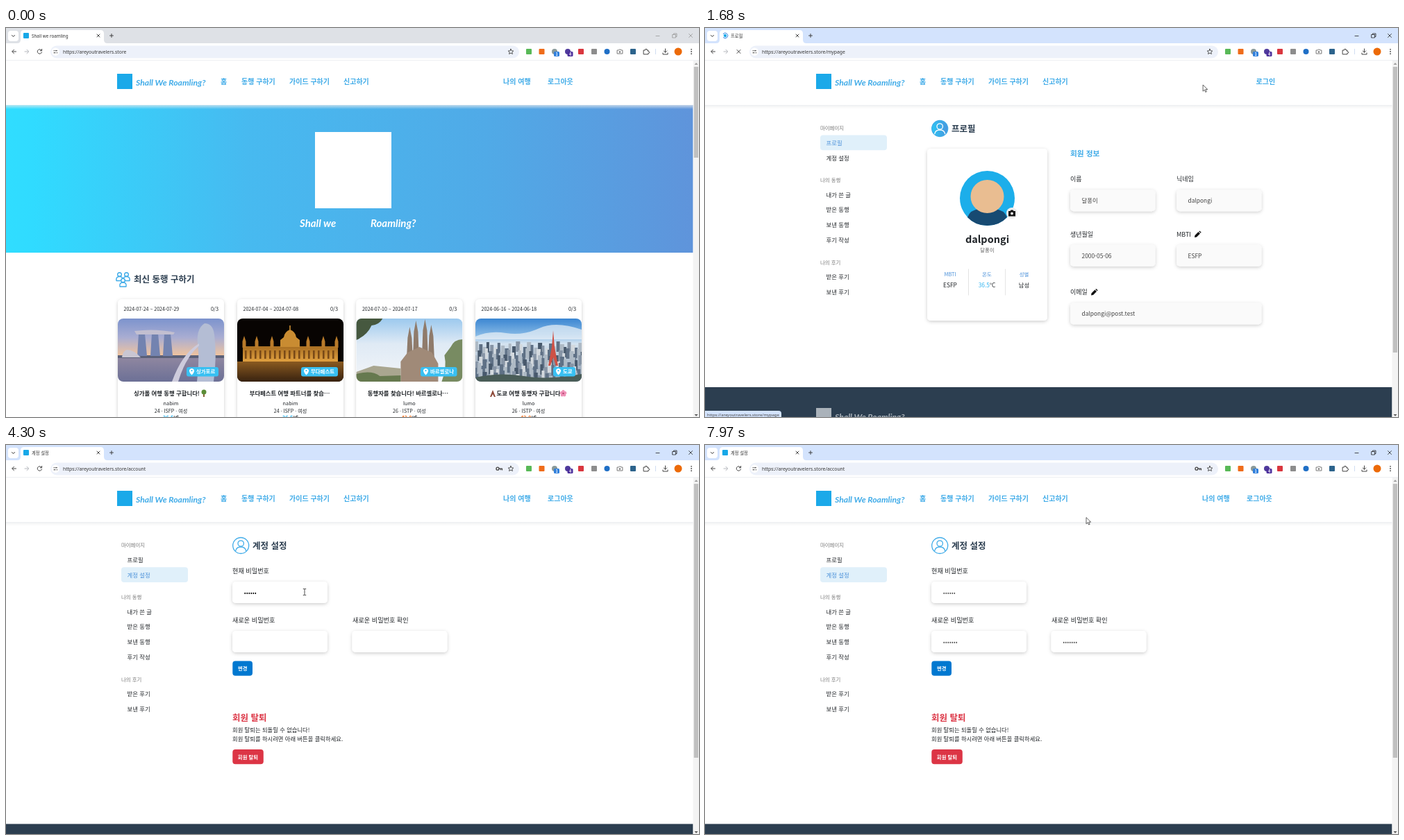
Animation of 998x561 px, one loop 8 s. Source, as an HTML page:

```html
<!DOCTYPE html>
<html lang="ko">
<head>
<meta charset="utf-8">
<style>
html, body { margin: 0; width: 100%; height: 100%; overflow: hidden; background: #fff; }
svg { display: block; width: 998px; height: 561px; font-family: "Noto Sans CJK KR", "Noto Sans CJK", "Noto Sans", sans-serif; }
.ui { font-family: "Noto Sans", "Noto Sans CJK KR", sans-serif; }
.script { font-family: Lato, sans-serif; font-style: italic; font-weight: 700; }
.line { fill: none; stroke-linecap: round; stroke-linejoin: round; }
</style>
</head>
<body>
<svg id="stage" viewBox="0 0 998 561" xmlns="http://www.w3.org/2000/svg"></svg>
<script>
const LOOP = 8000;
const SITE = 'https://areyoutravelers.store';
const INK = '#212529', SKY = '#3fabe8', NAVY = '#2c3e50', RED = '#dc3545';

const text = (x, y, s, size = 8.32, fill = INK, weight = 400, anchor = 'start', extra = '') =>
  `<text x="${x}" y="${y}" font-size="${size}" fill="${fill}" font-weight="${weight}" text-anchor="${anchor}" ${extra}>${s}</text>`;
const rect = (x, y, w, h, fill, r = 0, extra = '') =>
  `<rect x="${x}" y="${y}" width="${w}" height="${h}" rx="${r}" fill="${fill}" ${extra}/>`;
const circle = (x, y, r, fill, extra = '') => `<circle cx="${x}" cy="${y}" r="${r}" fill="${fill}" ${extra}/>`;
const shape = (d, fill, extra = '') => `<path d="${d}" fill="${fill}" ${extra}/>`;
const line = (d, stroke = '#444', w = 1, extra = '') => `<path class="line" d="${d}" stroke="${stroke}" stroke-width="${w}" ${extra}/>`;
const group = (id, body, extra = '') => `<g id="${id}" ${extra}>${body}</g>`;
const repeat = (n, make) => Array.from({ length: n }, (_, i) => make(i)).join('');
const gradient = (id, stops, vertical) =>
  `<linearGradient id="${id}" x2="${vertical ? 0 : 1}" y2="${vertical ? 1 : 0}">` +
  stops.map(([o, c]) => `<stop offset="${o}" stop-color="${c}"/>`).join('') + '</linearGradient>';
const SHADOW = 'filter="url(#shadow)"';

const defs = `<defs>
  <filter id="shadow" x="-10%" y="-25%" width="120%" height="160%"><feDropShadow dx="0" dy="1.5" stdDeviation="2.5" flood-opacity=".2"/></filter>
  ${gradient('hero', [[0, '#30ddff'], [.04, '#30dbff'], [.35, '#47baf0'], [.7, '#50aae7'], [1, '#5f94db']])}
  ${gradient('edge', [[0, '#e6e9ecc0'], [1, '#f0f0f000']], 1)}
  ${gradient('brand', [[0, '#2cc5f4'], [1, '#4a95dd']])}
  ${gradient('dusk', [[0, '#7c93cd'], [.3, '#a9add2'], [.58, '#eec3a0'], [.63, '#8e86a0'], [1, '#6c7096']], 1)}
  ${gradient('river', [[0, '#8a5a20'], [1, '#35200f']], 1)}
  ${gradient('day', [[0, '#9cc9ee'], [.4, '#dfeaf5'], [1, '#f3f5f8']], 1)}
  ${gradient('noon', [[0, '#3b86d2'], [.25, '#82b6e4'], [.4, '#d5e4f1'], [1, '#8493a5']], 1)}
  ${gradient('gold', [[0, '#a86e22'], [1, '#e0a040']], 1)}
  <clipPath id="photo"><rect width="153" height="91" rx="8"/></clipPath>
</defs>`;

function chrome() {
  const winButtons = line('M936 11.5h5M960 9.5h4.5v4.5h-4.5zM961.5 9v-1h4.5v4.5h-1M983.5 8.5l5 5M988.5 8.5l-5 5', '#222', .8, 'id="winButtons"');
  const plain = [['s', 753, '#58b957'], ['s', 771.5, '#ef6c1a'], ['c', 790, '#8a9a9a'], ['c', 809, '#4f3a9c'],
    ['s', 828, '#d9363e'], ['s', 847, '#8d8d8d'], ['c', 865.5, '#1f6fc6'], ['s', 903, '#2c638c']];
  const extensions = plain.map(([kind, x, c]) =>
    kind === 'c' ? circle(x, 34, 4, c) : rect(x - 4, 30, 8, 8, c, 1)).join('');
  const badge = (x, n, c) => rect(x - 4, 34, 8, 7, c, 1.5) + text(x, 39.6, n, 5.5, '#fff', 700, 'middle');
  return rect(0, 0, 998, 24, '#d3e3fd', 0, 'id="tabBar"') +
    rect(3, 4, 15, 15, '#fff', 4) + line('M8.5 10.5l2 2 2-2', '#333', 1) +
    shape('M16 22q5 0 5-5V8q0-5 5-5H136q5 0 5 5V17q0 5 5 5V25H16z', '#fff') +
    rect(0, 22, 998, 25, '#fff') + rect(0, 46.5, 998, .6, '#dfe3ea') +
    group('favicon', rect(25, 7, 8, 8, '#17a8e8', 1)) +
    group('spinner', circle(29, 11, 2.2, '#17a8e8') + line('M29 7.2a3.8 3.8 0 1 1-3.8 3.8', '#2b7de0', .9)) +
    text(37, 13.7, '', 6.3, '#333', 400, 'start', 'id="tabTitle" class="ui"') +
    line('M131 9l4 4M135 9l-4 4', '#333', .9) + line('M149.5 11h5M152 8.5v5', '#333', .9) + winButtons +
    rect(64, 25.5, 675, 18, '#edf1fa', 9) + circle(71.3, 34.3, 5.7, '#fff') +
    line('M69 32.8h.5M71 32.8h2.5M69 35.8h2M73.2 35.8h.5', '#333', 1.1) +
    text(82, 36.7, '', 6.8, '#333', 400, 'start', 'id="url" class="ui"') +
    line('M14.5 34h-5.5M11.5 31.2L8.7 34l2.8 2.8', '#444') + line('M27 34h5.5M30 31.2l2.8 2.8-2.8 2.8', '#b5b8bd') +
    group('reload', line('M51.3 32.5a3.2 3.2 0 1 0 .2 2.5M51.6 30.5v2.3h-2.3', '#444')) +
    group('stop', line('M46 31.5l5 5M51 31.5l-5 5', '#444')) +
    line('M727 30.3l1.1 2.5 2.7.3-2 1.8.6 2.6-2.4-1.4-2.4 1.4.6-2.6-2-1.8 2.7-.3z', '#444', .9) +
    group('key', circle(708, 34.2, 2, 'none', 'stroke="#444" stroke-width="1.3"') + line('M710 34.2h4.5v1.8M712.5 34.2v1.5', '#444', 1.2)) +
    extensions + badge(793, '1', '#2f7fdc') + badge(812.5, '4', '#4b2f9b') +
    line('M880.5 32h2l.8-1h1.8l.8 1h2v5h-7.4z', '#777') + circle(884, 34.5, 1.3, '#777') +
    line('M918.5 32h2.2a1.2 1.2 0 1 1 2.2 0h2v2.2a1.2 1.2 0 1 1 0 2v1.7h-6.4z', '#444') +
    rect(935, 30, .8, 8, '#c5d5ef') + line('M949.5 30v5M947.3 33l2.2 2.2 2.2-2.2M946 36v2h7v-2', '#444') +
    circle(968, 34, 5.5, '#ec6a08') + [30.8, 34, 37.2].map(y => circle(987, y, .9, '#444')).join('');
}

const scrollbar = bottom => rect(989.5, 47, 8.5, 514, '#f3f3f3') + rect(990.7, 56, 6.3, bottom - 56, '#c0c0c0') +
  shape('M991.5 53l2.5-3 2.5 3z', '#a0a0a0') + shape('M991.5 557l2.5 3 2.5-3z', '#606060');

function header() {
  const nav = [[309, '홈'], [339, '동행 구하기'], [408, '가이드 구하기'], [486, '신고하기']];
  return rect(0, 47, 989.5, 64, '#fff') + rect(0, 111, 989.5, 6, 'url(#edge)') +
    rect(160, 66, 22, 22, '#1ba9e9') + text(187, 82.5, 'Shall We Roamling?', 12.2, SKY, 700, 'start', 'class="script"') +
    nav.map(([x, s]) => text(x, 81.2, s, 10, SKY, 700)).join('') +
    group('member', text(716, 81.2, '나의 여행', 10, SKY, 700, 'start', 'id="myTrip"') + text(780, 81.2, '로그아웃', 10, SKY, 700)) +
    group('guest', text(793.5, 81.2, '로그인', 10, SKY, 700));
}

const marina = rect(0, 0, 153, 91, 'url(#dusk)') + rect(0, 53, 153, 4, '#5b6078') +
  [29, 48, 66].map(x => shape(`M${x - 1} 54L${x + 1} 22h9l3 32z`, '#7383b0')).join('') +
  shape('M24 18q30-4 58 2l-2 3H27z', '#c2bfd0') + shape('M6 56q1-9 7-11 10 0 20 11z', '#c9c6d2') +
  shape('M114 91q3-26 2-46-5-30 9-38 12 0 14 16 4 32-1 68z', '#b4bdd4') +
  shape('M117 36q-24 14-39 55h9q10-34 30-52z', '#cdcbdc');

const palace = rect(0, 0, 153, 92, '#080402') + rect(0, 62, 153, 30, 'url(#river)') + rect(8, 40, 137, 22, 'url(#gold)') +
  shape('M62 41V31l5-4q1-8 9-11 8 3 9 11l5 4v10z', '#c98c32') + rect(75.2, 10, 1.6, 8, '#c98c32') +
  [10, 28, 50, 102, 124, 143].map(x => shape(`M${x - 2.5} 42v-9l2.5-8 2.5 8v9z`, '#b97b2a')).join('') +
  repeat(19, i => rect(11 + i * 7, 46, 2.6, 12, '#7a4a17'));

const basilica = rect(0, 0, 153, 91, 'url(#day)') +
  [[77, 12], [86, 3], [99, 1], [108, 9]].map(([x, y]) => shape(`M${x - 5} 70L${x - 3} ${y + 16}l3-16 3 16 2 ${54 - y}z`, '#8f7b6b')).join('') +
  shape('M64 91V62l10-13 17-8 18 8 9 16v26z', '#a08a78') + shape('M0 91V77l25-9 39 4v19z', '#a9a690') +
  shape('M0 91V80q22-6 34 3l30-1v9z', '#66794f') + shape('M0 0h38q-5 9-16 10-6 14-22 21z', '#46583f') +
  shape('M153 30q-12 0-17 11l-9 12q4 18-4 38h30z', '#788b62');

const skyline = rect(0, 0, 153, 91, 'url(#noon)') + shape('M0 26q20-9 44-5t48-7 61 2v14H0z', '#eef4f8b0') +
  repeat(150, i => {
    const row = Math.floor(i / 30), x = i % 30 * 5.3 - (row % 2) * 2, y = 33 + row * 10 + i * 37 % 11;
    return rect(x, y, 4 + i % 3, 15, ['#aebac5', '#5f7186', '#d3d9de', '#8795a6', '#48596c'][i * 13 % 7 % 5]);
  }) + shape('M0 91v-6q35-8 70-2t83-3v11z', '#4a5d58') + shape('M105 68l5-27 2-24 2 24 5 27h-3l-4-12-4 12z', '#cf5146');

const photos = [marina, palace, basilica, skyline];

function card(i, [dates, city, badgeX, badgeW, title, user, info, temp, tempColor]) {
  const x = [161, 333, 504.4, 676][i], mid = x + 76.5;
  return rect(x, 391, 153, 190, '#fff', 6, SHADOW) + text(x + 8.5, 408.3, dates, 7) + text(x + 145, 408.3, '0/3', 7.4, INK, 400, 'end') +
    `<g transform="translate(${x} 419)" clip-path="url(#photo)">${photos[i]}</g>` +
    rect(badgeX, 489, badgeW, 13.5, '#39c0f2', 3) + shape(`M${badgeX + 7.5} 500.5q-6-6-2.2-8.8 2.2-1.3 4.4 0 3.8 2.8-2.2 8.8z`, '#fff') +
    circle(badgeX + 7.5, 494.2, 1.1, '#39c0f2') + text(badgeX + 14, 498.3, city, 7.4, '#fff', 700) +
    text(mid + [-6, -1, -2, 0][i], 529.8, title, 8.4, INK, 700, 'middle') + text(mid, 544, user, 7.3, INK, 400, 'middle') +
    text(mid, 555, info, 7.1, INK, 400, 'middle') + text(mid, 565.2, `<tspan fill="${tempColor}">${temp}</tspan>°C`, 7.3, INK, 700, 'middle');
}

function home() {
  const person = (x, y) => circle(x, y, 2.8, '#fff', `stroke="${SKY}" stroke-width="1.4"`) +
    line(`M${x - 4.5} ${y + 9}q-1-6 4.5-6t4.5 6z`, SKY, 1.4);
  const cards = [
    ['2024-07-24 ~ 2024-07-29', '싱가포르', 260, 46, '싱가폴 여행 동행 구합니다!', 'nabim', '24 · ISFP · 여성', '36.5', '#27b5f0'],
    ['2024-07-04 ~ 2024-07-08', '부다페스트', 425, 53, '부다페스트 여행 파트너를 찾습⋯', 'nabim', '24 · ISFP · 여성', '36.5', '#27b5f0'],
    ['2024-07-10 ~ 2024-07-17', '바르셀로나', 597, 52.5, '동행자를 찾습니다! 바르셀로나⋯', 'lumo', '26 · ISTP · 여성', '42.0', '#f2701d'],
    ['2024-06-16 ~ 2024-06-18', '도쿄', 788, 32, '도쿄 여행 동행자 구합니다', 'lumo', '26 · ISTP · 여성', '42.0', '#f2701d']
  ];
  const petals = repeat(5, i => circle(802.5 + 2.8 * Math.sin(i * 1.257), 527 - 2.8 * Math.cos(i * 1.257), 2.2, '#ef91b7'));
  return rect(0, 111, 989.5, 213, 'url(#hero)') + rect(445, 150, 110, 110, '#fff') +
    text(423, 287, 'Shall we', 15, '#fff', 700, 'start', 'class="script"') + text(525, 287, 'Roamling?', 15, '#fff', 700, 'start', 'class="script"') +
    person(163.5, 355.5) + person(173.5, 355.5) + person(168.5, 364) +
    text(184, 366.7, '최신 동행 구하기', 12.5, NAVY, 700) + cards.map((c, i) => card(i, c)).join('') +
    rect(284, 525, 2, 7, '#8a6037') + circle(285, 525, 3.5, '#5b8d37') +
    shape('M697 532l4-10 4 10h-2l-2-4-2 4z', '#8d4a3a') + petals + circle(802.5, 527, 1.3, '#b94b76') + scrollbar(187);
}

function sidebar(active) {
  const items = [['프로필', 168.8], ['계정 설정', 190.5], ['내가 쓴 글', 243.6], ['받은 동행', 265.4], ['보낸 동행', 287], ['후기 작성', 308.7], ['받은 후기', 361.7], ['보낸 후기', 383.5]];
  return rect(166, items[active][1] - 14.3, 96, 21.7, '#e0f0fa', 4) +
    [['마이페이지', 147], ['나의 동행', 222], ['나의 후기', 340.7]].map(([s, y]) => text(166, y, s, 7.4, '#777')).join('') +
    items.map(([s, y], i) => text(174.5, y, s, 8.4, i === active ? '#4a90d9' : INK)).join('');
}

const userIcon = (stroke, fill) => circle(338.2, 145, 11.5, fill, `stroke="${SKY}" stroke-width="1.3"`) +
  circle(338.2, 142, 4.2, 'none', `stroke="${stroke}" stroke-width="1.3"`) + line('M330.8 152.5q1-5.5 7.4-5.5t7.4 5.5', stroke, 1.3);
const heading = s => text(355, 150, s, 12.5, NAVY, 700);
const field = (x, y, w, fill = '#fff') => rect(x, y, w, 31, fill, 5, SHADOW);

function profile() {
  const pencil = (x, y) => shape(`M${x} ${y + 9}l.5-3 5-5 2.5 2.5-5 5zM${x + 6.3} ${y + .4}l1-1 2.4 2.4-1 1z`, '#111');
  const facts = [[526, 217, '이름', '달퐁이', 122.5], [679, 217, '닉네임', 'dalpongi', 122.5], [526, 296.5, '생년월일', '2000-05-06', 122.5],
    [679, 296.5, 'MBTI', 'ESFP', 122.5], [526, 380.2, '이메일', 'dalpongi@post.test', 275.5]];
  const stats = [[353, 'MBTI', 'ESFP'], [406, '온도', '<tspan fill="#35b5f0">36.5</tspan>°C'], [459.5, '성별', '남성']];
  return sidebar(0) + userIcon('#fff', 'url(#brand)') + heading('프로필') +
    rect(320, 174, 173, 248, '#fff', 5, SHADOW) + circle(406.5, 245.5, 39.5, '#1caeea') +
    shape('M378 273q4-11 17-12h22q14 1 18 12-11 12-28.5 12T378 273z', '#174a72') + circle(406.5, 243, 24, '#e9bd91') +
    circle(442, 267, 8, '#eee') + shape('M437 264h2.5l1-1.5h3l1 1.5h2.5v7.5h-10z', '#111') + circle(442, 267.5, 1.9, '#eee') +
    text(406.5, 310, 'dalpongi', 14.5, INK, 700, 'middle') + text(406.5, 323.3, '달퐁이', 7.4, '#666', 400, 'middle') +
    stats.map(([x, k, v]) => text(x, 358, k, 7.4, '#4a90d9', 400, 'middle') + text(x, 374.3, v, 8.4, INK, 500, 'middle')).join('') +
    rect(379, 347.5, .8, 38, '#ddd') + rect(432.3, 347.5, .8, 38, '#ddd') + text(526, 185.3, '회원 정보', 10.7, SKY, 700) +
    facts.map(([x, y, k, v, w]) => text(x, y + 4, k, 9, INK, 500) + field(x, y + 16.2, w, '#fafafa') + text(x + 16.5, y + 35.2, v, 8.4, '#444')).join('') +
    pencil(705, 293) + pencil(556, 376.5) + rect(0, 518, 989.5, 43, NAVY) + rect(160, 548, 22, 22, '#aab2ba') +
    text(187, 565, 'Shall We Roamling?', 12.2, '#aab2ba', 700, 'start', 'class="script"') + scrollbar(468);
}

const inputs = [{ x: 326, y: 197 }, { x: 326, y: 268 }, { x: 498.5, y: 268 }];

function account() {
  return sidebar(1) + userIcon(SKY, '#fff') + heading('계정 설정') +
    text(326, 185, '현재 비밀번호', 9.15) + text(326, 255.5, '새로운 비밀번호', 9.15) + text(499, 255.5, '새로운 비밀번호 확인', 9.15) +
    inputs.map(({ x, y }, i) => field(x, y, 137) + text(x + 16.8, y + 19.5, '', 8, INK, 400, 'start', `id="secret${i}" class="ui"`)).join('') +
    rect(0, 0, .8, 13.5, '#111', 0, 'id="caret"') +
    group('submit', rect(326.3, 311.5, 28.7, 21.3, '#0078d0', 4, 'id="submitFace"') + text(340.7, 325, '변경', 7.4, '#fff', 700, 'middle')) +
    text(326, 397.6, '회원 탈퇴', 12.5, RED, 700) + text(326, 414.2, '회원 탈퇴는 되돌릴 수 없습니다!') +
    text(326, 427.2, '회원 탈퇴를 하시려면 아래 버튼을 클릭하세요.') +
    rect(326.3, 439, 44.5, 21.3, RED, 4) + text(348.5, 452.6, '회원 탈퇴', 7.4, '#fff', 700, 'middle') +
    rect(0, 546.5, 989.5, 15, NAVY) + scrollbar(451);
}

const overlays = group('suggest', rect(329, 302, 247, 150, '#fff', 4, SHADOW)) +
  group('dialog', rect(383, 46, 232, 72, '#fff', 6, SHADOW) + rect(572, 96, 33, 16, '#0b57d0', 8)) +
  group('status', shape('M0 552h106q4 0 4 4v5H0z', '#d3e3fd') + text(3, 560, '', 5.9, '#444', 400, 'start', 'id="statusText" class="ui"'));

const pointer = group('pointer',
  group('arrow', shape('M0 0v9.2l2.2-2 1.5 3.3 1.5-.7-1.5-3.2h3z', '#fff', 'stroke="#222" stroke-width=".7"')) +
  group('hand', shape('M-1 .8q1-1.6 2 0v4l1.2.2 1.2.4 1.3.4q1.3.4 1 2l-.8 3.7h-4.7l-3-4.3q.3-1.6 1.8-.3z', '#fff', 'stroke="#222" stroke-width=".8"')) +
  group('beam', line('M-1.8-4.5h1.3l.5.5.5-.5h1.3M0-4v8M-1.8 4.5h1.3l.5-.5.5.5h1.3', '#222', .8)));

document.getElementById('stage').innerHTML = defs + rect(0, 0, 998, 561, '#fff') +
  group('home', home()) + group('profile', profile()) + group('account', account()) + header() + chrome() + overlays + pointer;

const ui = {};
document.querySelectorAll('[id]').forEach(el => { ui[el.id] = el; });
const show = (id, on) => ui[id].setAttribute('visibility', on ? 'inherit' : 'hidden');
const put = (id, s) => { if (ui[id].textContent !== s) ui[id].textContent = s; };

// Step tables hold [start time, value].
const steps = {
  page: [[0, 'home'], [1660, 'profile'], [2700, 'account']],
  route: [[0, ''], [1000, '/mypage'], [2660, '/account']],
  title: [[0, 'Shall we roamling'], [1000, '프로필'], [2700, '계정 설정']],
  loading: [[0, 0], [960, 1], [2010, 0], [2620, 1], [3000, 0]],
  member: [[0, 1], [1660, 0], [1850, 1], [2700, 0], [2940, 1]],
  status: [[0, ''], [560, '/mypage'], [1760, ''], [2420, '/account'], [2700, '']],
  focus: [[0, -1], [3130, 0], [4640, 1], [5860, 2], [7120, -1]],
  caret: [[0, 1], [3340, 0], [3490, 1], [4110, 0], [4640, 1], [5550, 0], [5860, 1], [6070, 0], [6160, 1], [7080, 0]]
};
const typing = [[3530, 72, 6], [4870, 77, 7], [6160, 70, 7]];
const path = [[330, 972, 230], [650, 729, 79], [1640, 729, 79], [2070, 264, 197], [2420, 212, 189], [2880, 212, 189],
  [3110, 430, 212], [4300, 430, 212], [4620, 437, 288], [5640, 437, 288], [5830, 560, 286], [6780, 560, 286],
  [7080, 345, 322], [7280, 345, 322], [7580, 585, 103], [7770, 585, 103], [7960, 549, 104.5]];

const at = (name, t) => steps[name].reduce((v, [start, next]) => t >= start ? next : v, '');
const between = (t, a, b) => t >= a && t < b;
const inside = (x, y, l, top, w, h) => between(x, l, l + w) && between(y, top, top + h);

function pointerAt(t) {
  const i = path.findIndex(p => p[0] > t);
  if (i < 1) return (i ? path[path.length - 1] : path[0]).slice(1);
  const [a, b] = [path[i - 1], path[i]], k = (t - a[0]) / (b[0] - a[0]), e = k * k * (3 - 2 * k);
  return [a[1] + (b[1] - a[1]) * e, a[2] + (b[2] - a[2]) * e];
}

function draw(t) {
  const page = at('page', t), loading = at('loading', t), member = at('member', t), active = t >= 910;
  ['home', 'profile', 'account'].forEach(id => show(id, id === page));
  show('member', member);
  show('guest', !member);
  show('favicon', !loading);
  show('spinner', loading);
  show('reload', !loading);
  show('stop', loading);
  ui.spinner.setAttribute('transform', `rotate(${t * .4 % 360} 29 11)`);
  ui.tabBar.setAttribute('fill', active ? '#d3e3fd' : '#dee1e6');
  ui.winButtons.setAttribute('stroke', active ? '#222' : '#999');
  put('tabTitle', at('title', t));
  put('url', SITE + at('route', t));
  show('key', t >= 3530);

  const status = at('status', t);
  show('status', status);
  put('statusText', SITE + status);

  const focus = at('focus', t);
  const counts = typing.map(([start, gap, max]) => Math.max(0, Math.min(max, Math.floor((t - start) / gap) + 1)));
  counts.forEach((n, i) => {
    put('secret' + i, '•'.repeat(n));
    ui['secret' + i].setAttribute('fill', i === focus ? '#000' : '#555');
  });
  show('caret', page === 'account' && focus >= 0 && at('caret', t));
  if (focus >= 0) {
    const { x, y } = inputs[focus];
    ui.caret.setAttribute('x', x + 17 + counts[focus] * 3.04);
    ui.caret.setAttribute('y', y + 8.5);
  }

  const modal = between(t, 7260, 7790);
  show('suggest', between(t, 4740, 5560));
  show('dialog', modal);

  const [x, y] = pointerAt(t);
  const onLink = page === 'home' && inside(x, y, 714, 70, 44, 16);
  const onSubmit = page === 'account' && (modal || inside(x, y, 326, 310, 29, 23));
  const onItem = page !== 'home' && inside(x, y, 166, 154, 96, 44);
  const onInput = page === 'account' && inputs.some(f => inside(x, y, f.x, f.y, 137, 31));
  ui.myTrip.setAttribute('fill', onLink ? '#3f86cc' : SKY);
  ui.submit.setAttribute('transform', `translate(0 ${onSubmit ? -1 : 0})`);
  ui.submitFace.setAttribute('fill', onSubmit ? '#0060b8' : '#0078d0');
  ui.submitFace.setAttribute('filter', onSubmit ? 'url(#shadow)' : 'none');

  const kind = onInput && !modal ? 'beam' : (onLink || onItem || onSubmit && !modal) ? 'hand' : 'arrow';
  ['arrow', 'hand', 'beam'].forEach(id => show(id, id === kind));
  ui.pointer.setAttribute('display', t < 330 ? 'none' : 'inline');
  ui.pointer.setAttribute('transform', `translate(${x.toFixed(1)} ${y.toFixed(1)})`);
}

const begin = performance.now();
function tick() {
  draw((performance.now() - begin) % LOOP);
  requestAnimationFrame(tick);
}
tick();
</script>
</body>
</html>
```
